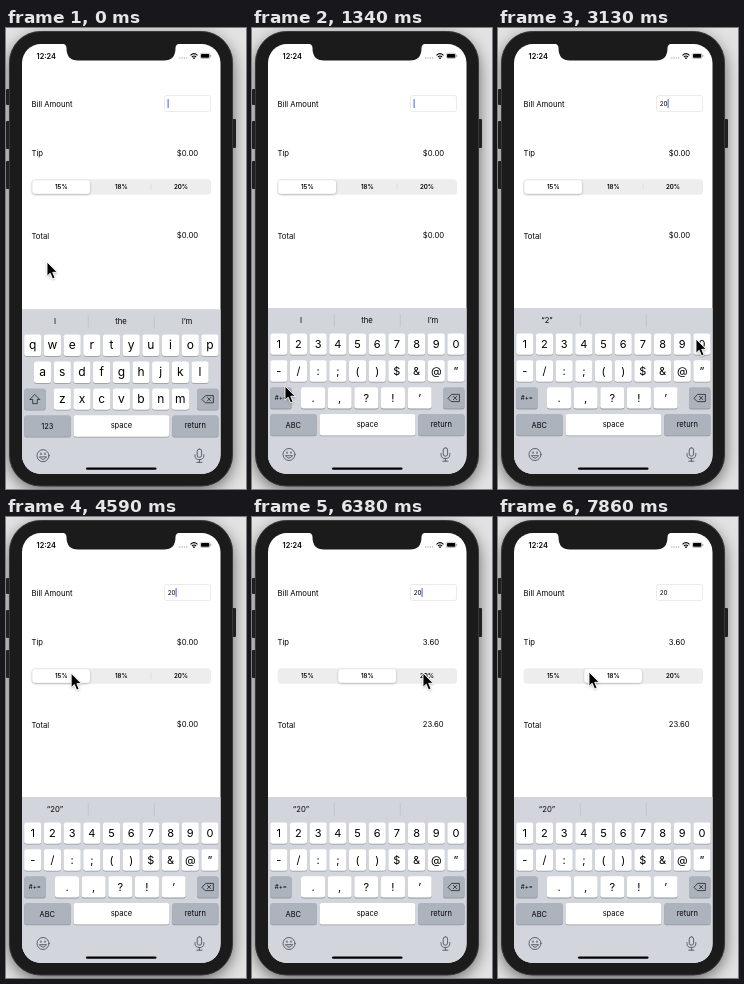
Animation, 240 px wide and 461 px high, one loop 8000 ms. Source, as an HTML page:

```html
<!DOCTYPE html>
<html lang="en">
<head>
<meta charset="utf-8">
<title>Tip calculator</title>
<style>
html, body { margin: 0; width: 100%; height: 100%; overflow: hidden; background: #d8d8d8; }
svg { display: block; width: 100vw; height: 100vh; font-family: Inter, Roboto, sans-serif; fill: #000; }
.mid { text-anchor: middle; }
.label { font-size: 7.7px; }
.seg { font-size: 6.2px; font-weight: 600; text-anchor: middle; }
.line { fill: none; stroke: #222; stroke-width: .8; stroke-linecap: round; stroke-linejoin: round; }
.icon { fill: none; stroke: #50555c; stroke-width: .9; stroke-linecap: round; }
</style>
</head>
<body>
<svg viewBox="0 0 240 461" preserveAspectRatio="none">
  <defs>
    <clipPath id="screen"><rect x="16" y="16" width="198.5" height="430" rx="19"/></clipPath>
    <filter id="halo" x="-20%" y="-20%" width="140%" height="140%"><feGaussianBlur stdDeviation="8"/></filter>
    <filter id="soft" x="-40%" y="-40%" width="180%" height="180%"><feDropShadow dx="0" dy=".8" stdDeviation="1.1" flood-opacity=".3"/></filter>
  </defs>

  <rect width="240" height="461" fill="#e2e2e2"/>
  <rect x="3" y="8" width="224" height="455" rx="34" opacity=".55" filter="url(#halo)"/>
  <g fill="#202020">
    <rect x="0" y="61" width="5" height="16" rx="1"/>
    <rect x="0" y="93" width="5" height="28" rx="1"/>
    <rect x="0" y="133" width="5" height="28" rx="1"/>
    <rect x="225" y="91" width="5" height="29" rx="1"/>
  </g>
  <rect x="3.5" y="3.5" width="223" height="454.5" rx="31" fill="#1b1b1c" stroke="#39393b"/>
  <rect x="16" y="16" width="198.5" height="430" rx="19" fill="#fff"/>
  <path d="M56 15.5Q60.5 16 60.5 20Q60.5 32.5 72 32.5H158Q169.500 32.5 169.500 20Q169.500 16 174 15.5Z" fill="#1b1b1c"/>

  <text x="30.500" y="30.800" font-size="7.4" font-weight="600">12:24</text>
  <g fill="#aaa" id="dots"></g>
  <g fill="none" stroke="#000" stroke-width="1.100">
    <path d="M184.500 27.300Q188 24.100 191.500 27.300M185.900 29Q188 27 190.100 29"/>
    <circle cx="188" cy="30.200" r=".35"/>
    <rect x="194.300" y="25.300" width="9.600" height="5.200" rx="1.400" stroke="#888" stroke-width=".5"/>
  </g>
  <rect x="195" y="26" width="8.200" height="3.800" rx=".8"/>
  <rect x="204.400" y="27" width=".8" height="1.800" rx=".4" fill="#888"/>

  <g class="label">
    <text x="25.500" y="78.600">Bill Amount</text>
    <text x="25.500" y="128">Tip</text>
    <text x="25.500" y="210.600">Total</text>
    <text x="170.800" y="127.800" id="tip"></text>
    <text x="170.800" y="210.400" id="total"></text>
  </g>
  <rect x="158.500" y="67.500" width="46" height="16" rx="2" fill="#fff" stroke="#e6e6e6" stroke-width=".8"/>
  <text x="161.700" y="78" font-size="6.3" id="bill"></text>
  <rect y="71" width="1" height="9" fill="#3f62e4" id="caret"/>

  <rect x="25.500" y="151.200" width="179.500" height="15.600" rx="3.500" fill="#ededee"/>
  <path d="M85.300 155.500V162.500" stroke="#d2d2d4" stroke-width=".5" id="div1"/>
  <path d="M145.200 155.500V162.500" stroke="#d2d2d4" stroke-width=".5" id="div2"/>
  <rect y="152.200" width="57.600" height="13.600" rx="3" fill="#fff" filter="url(#soft)" id="thumb"/>
  <g class="seg">
    <text x="55.300" y="161.200">15%</text>
    <text x="115.300" y="161.200">18%</text>
    <text x="175" y="161.200">20%</text>
  </g>

  <g clip-path="url(#screen)">
    <g id="board">
      <rect x="16" y="280" width="199" height="170" fill="#d2d5db"/>
      <path d="M82.300 286V299M148.300 286V299" stroke="#bdc1c8" stroke-width=".7"/>
      <g class="mid" font-size="7.7" id="hints"></g>
      <g id="letters"></g>
      <g id="numbers"></g>
      <g id="common"></g>
      <g class="icon">
        <circle cx="37" cy="426.500" r="6"/>
        <path d="M33.600 428Q37 432.600 40.400 428Z"/>
        <path d="M35 424V425.200M39 424V425.200" stroke-width="1.200"/>
        <rect x="191.200" y="419.800" width="4.400" height="8.400" rx="2.200"/>
        <path d="M189 425.500V426.500Q189 430.500 193.400 430.500Q197.800 430.500 197.800 426.500V425.500M193.400 430.500V433M190.800 433.200H196"/>
      </g>
    </g>
  </g>
  <rect x="80" y="439.400" width="70.500" height="2.400" rx="1.200"/>
  <g id="pop" filter="url(#soft)">
    <path id="popShape" fill="#fff"/>
    <text class="mid" y="295.500" font-size="18.5" id="popText"></text>
  </g>
  <path id="mouse" d="M0 0V14.200L3.200 11.200 5.500 16.800 8 15.800 5.700 10.300H10.200Z" stroke="#fff" stroke-width=".9" stroke-linejoin="round" filter="url(#soft)"/>
</svg>
<script>
const $ = id => document.getElementById(id);
const LOOP = 8000, TICKS = 54, PITCH = 19.68;

const key = (x, y, w, fill = '#fff') =>
  `<rect x="${x}" y="${y + .8}" width="${w}" height="21.4" rx="2.5" fill="#92969d"/>` +
  `<rect x="${x}" y="${y}" width="${w}" height="21.4" rx="2.5" fill="${fill}"/>`;
const word = (s, x, y, size) =>
  `<text class="mid" x="${x}" y="${y}" font-size="${size}">${s}</text>`;
const row = (chars, x, y, w, pitch, size, drop) => [...chars].map((c, i) =>
  key(x + i * pitch, y, w) +
  word(c === '&' ? '&amp;' : c, x + i * pitch + w / 2, y + 10.7 + drop, size)).join('');

const GREY = '#adb3bd', Y = [305.4, 332.3, 359.2, 386.1];

$('letters').innerHTML =
  row('qwertyuiop', 18.2, Y[0], 17.2, PITCH, 12, 3.5) +
  row('asdfghjkl', 28, Y[1], 17.2, PITCH, 12, 3.5) +
  row('zxcvbnm', 47.7, Y[2], 17.2, PITCH, 12, 3.5) +
  key(18.2, Y[2], 21.5, GREY) + key(18.2, Y[3], 46.6, GREY) +
  '<path class="line" d="M29 365.500L33.800 370.300H31.300V374.500H26.700V370.300H24.200Z"/>' +
  word('123', 41.3, Y[3] + 13.4, 7.5);

$('numbers').innerHTML =
  row('1234567890', 18.2, Y[0], 17.2, PITCH, 11, 4) +
  row('-/:;()$&@”', 18.2, Y[1], 17.2, PITCH, 11, 4) +
  row('.,?!’', 49, Y[2], 24, 26.65, 11, 4) +
  key(18.2, Y[2], 21.5, GREY) + word('#+=', 28.9, Y[2] + 13, 6.2) +
  key(18.2, Y[3], 46.6, GREY) + word('ABC', 41.3, Y[3] + 13.4, 7.5);

$('common').innerHTML =
  key(191, Y[2], 21.5, GREY) +
  '<path class="line" d="M196.200 370L199.600 366.400H207.400V373.600H199.600ZM201.400 368.300L204.800 371.700M204.800 368.300L201.400 371.700"/>' +
  key(67.6, Y[3], 95.7) + word('space', 115.4, Y[3] + 13, 7.5) +
  key(166.2, Y[3], 46.3, GREY) + word('return', 189.3, Y[3] + 13, 7.5);

$('dots').innerHTML = [0, 1, 2, 3].map(i =>
  `<circle cx="${173.800 + i * 2.3}" cy="30" r=".65"/>`).join('');

// Key-press balloon: head from l to r, stem over the key from a to b.
function balloon(l, r, a, b) {
  return `M${l + 5} 275H${r - 5}Q${r} 275 ${r} 280V296C${r} 302 ${b} 301 ${b} 307V324` +
    `Q${b} 327 ${b - 3} 327H${a + 3}Q${a} 327 ${a} 324V307C${a} 301 ${l} 302 ${l} 296V280Q${l} 275 ${l + 5} 275Z`;
}

// Pointer path as [tick, x, y], thumb path as [tick, segment].
const mousePath = [
  [0, 41, 234], [1, 41, 236], [6, 33, 393], [8, 33, 393], [9, 33, 358], [14, 44, 314],
  [16, 44, 314], [18, 198, 311], [22, 198, 311], [27, 66, 158], [31, 65, 156],
  [36, 65, 156], [39, 114, 157], [41, 116, 157], [43, 171, 156], [46, 171, 156],
  [49, 118, 156], [51, 118, 156], [53, 91, 155]
];
const thumbPath = [[0, 0], [38, 0], [40, 1], [44, 1], [46, 2], [50, 2], [52, 1]];

function along(path, n, col) {
  const i = path.findIndex(p => p[0] > n);
  if (i < 0) return path[path.length - 1][col];
  const a = path[i - 1], b = path[i];
  const u = (n - a[0]) / (b[0] - a[0]);
  return a[col] + (b[col] - a[col]) * u * u * (3 - 2 * u);
}

const show = (id, on) => $(id).setAttribute('display', on ? 'inline' : 'none');
const clamp = v => Math.max(0, Math.min(1, v));

function draw(n) {
  const bill = n < 17 ? '' : n < 21 ? '2' : '20';
  $('bill').textContent = bill;
  $('caret').setAttribute('x', 161.6 + bill.length * 4);
  const phase = n * LOOP / TICKS % 1000;
  $('caret').setAttribute('opacity', clamp((660 - phase) / 130) + clamp((phase - 900) / 100));

  const rate = n < 39 ? 0 : n >= 45 && n < 51 ? 20 : 18;
  $('tip').textContent = rate ? (20 * rate / 100).toFixed(2) : '$0.00';
  $('total').textContent = rate ? (20 + 20 * rate / 100).toFixed(2) : '$0.00';

  const seg = along(thumbPath, n, 1);
  $('thumb').setAttribute('x', 26.4 + seg * 60);
  show('div1', seg > 1.5);
  show('div2', seg < .5);

  $('board').setAttribute('transform', `translate(0 ${n < 1 ? 1.2 : 0})`);
  show('letters', n < 8);
  show('numbers', n >= 8);
  const hints = n < 17 ? ['I', 'the', 'I’m'] : [n < 22 ? '“2”' : '“20”'];
  $('hints').innerHTML = hints.map((s, i) => word(s, 49 + i * 66, 295, 7.7)).join('');

  const two = n === 16;
  show('pop', two || n === 20);
  $('popShape').setAttribute('d', two ? balloon(31.4, 61.6, 37.9, 55.1) : balloon(186, 213, 195.3, 212.5));
  $('popText').setAttribute('x', two ? 46.5 : 199.5);
  $('popText').textContent = two ? '2' : '0';

  $('mouse').setAttribute('transform', `translate(${along(mousePath, n, 1)} ${along(mousePath, n, 2)})`);
}

let last = -1;
function loop() {
  const n = Math.floor(performance.now() % LOOP / LOOP * TICKS);
  if (n !== last) draw(last = n);
  requestAnimationFrame(loop);
}
loop();
</script>
</body>
</html>
```
